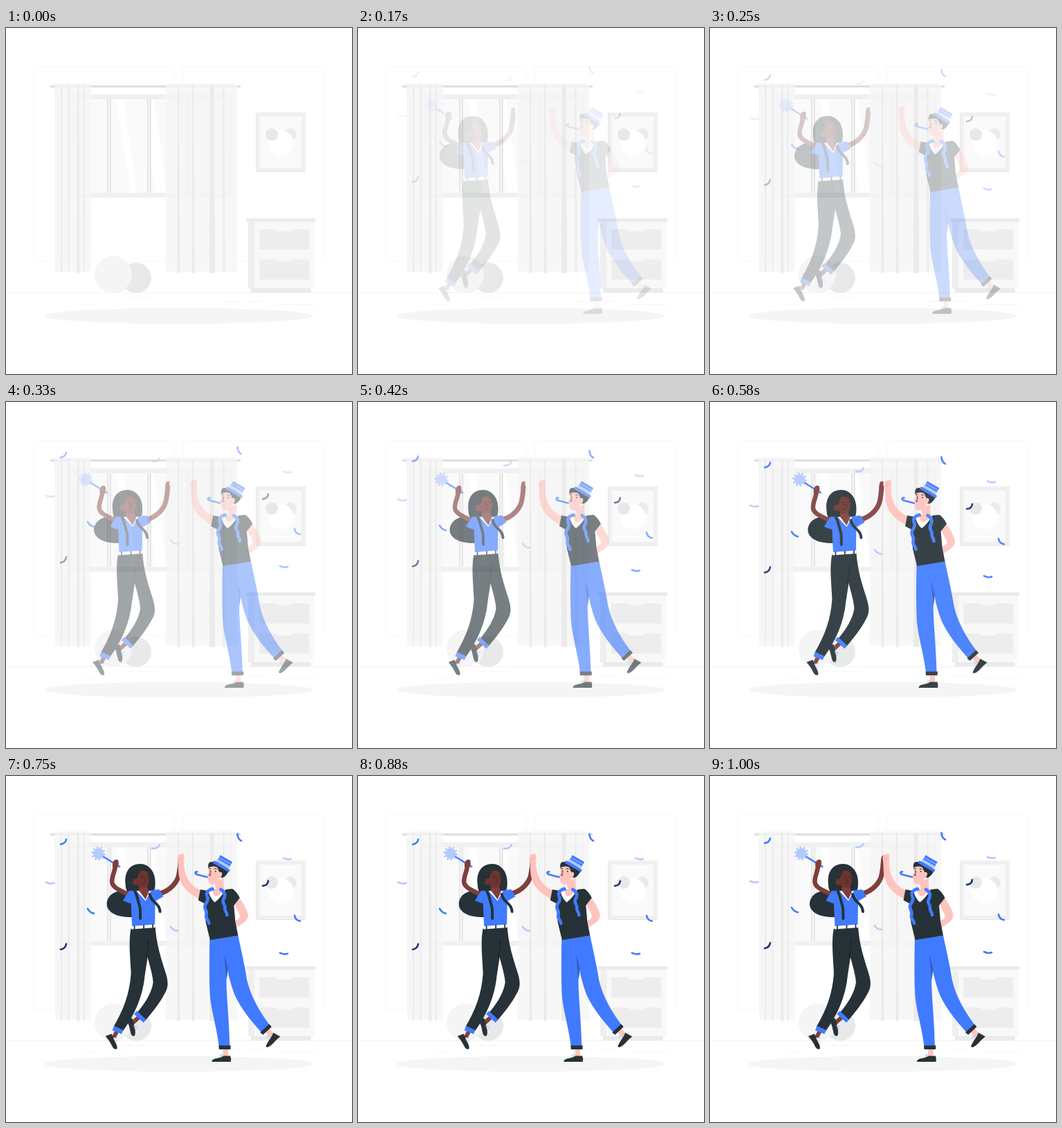
These frames come from a looping animation (500x500 px, 1040 ms). An HTML page:

```html
<!DOCTYPE html>
<html lang="en">
<head>
<meta charset="utf-8">
<title>Party high five</title>
<style>
  html, body { margin: 0; width: 100%; height: 100%; overflow: hidden; background: #fff; }
  svg { display: block; width: 100%; height: 100%; }
  :root { --p: 0; --shift: calc((1 - var(--p)) * 30px); }
  .girl, .man, .confetti { opacity: var(--p); }
  .girl { transform: translateX(calc(var(--shift) * -1)); }
  .man { transform: translateX(var(--shift)); }
  .confetti { transform: translateY(calc(var(--shift) * -1)); }
  .line { fill: none; stroke-linecap: round; stroke-linejoin: round; }
  .blue { fill: #407bff; }
  .pale { fill: #b3caff; }
  .dark { fill: #263238; }
  .brown { fill: #7f3e3b; }
  .pink { fill: #ffc3bd; }
  .s-blue { stroke: #407bff; }
  .s-pale { stroke: #b3caff; }
  .s-navy { stroke: #1e3470; }
  .s-dark { stroke: #263238; }
  .s-brown { stroke: #7f3e3b; }
  .s-pink { stroke: #ffc3bd; }
</style>
</head>
<body>
<svg viewBox="0 0 500 500">
  <!-- room -->
  <g fill="none" stroke="#f8f8f8">
    <rect x="39.5" y="55.5" width="203" height="282" rx="3"/>
    <rect x="255.500" y="55.5" width="203" height="282" rx="3"/>
    <path stroke="#f2f2f2" d="M0 382.500H500"/>
    <path stroke="#f5f5f5" d="M112 399.500h19M176 389.500h40M312 395.500h25M352 395.500h17M392 399.500h56"/>
  </g>

  <!-- window -->
  <rect x="89" y="96" width="238" height="149" fill="#f0f0f0"/>
  <rect x="93" y="103" width="230" height="135.500" fill="#fafafa"/>
  <path fill="#fff" d="M159 103h11l19 135h-9zM209 103h5l18 135h-15l-8-48z"/>
  <path fill="#f0f0f0" d="M146 103h6v135h-6zM204 103h6v135h-6zM261 103h6v135h-6z"/>
  <path stroke="#e0e0e0" d="M92.500 103V238M146.500 103V238M151.500 103V238M204.500 103V238M209 103V238M262 103V238"/>

  <!-- curtains -->
  <rect x="64" y="83" width="275" height="3" rx="1" fill="#dedede"/>
  <g fill="#f5f5f5" opacity=".8">
    <path d="M70 80h53l-1 272H71zM231 80h103v272H231z"/>
  </g>
  <g fill="#ebebeb">
    <path d="M79 82h2v272h-2zM89.500 82h2v272h-2zM103 82h2.500l1 272h-4zM111.500 82h2v272h-2z"/>
    <path d="M248 82h2l1.500 272h-4zM269 82h2l1.500 272h-4zM295 82h5l2 272h-8zM313.500 82h2l1 272h-3z"/>
  </g>

  <!-- picture -->
  <rect x="361" y="122" width="72" height="86" fill="#f0f0f0"/>
  <path fill="none" stroke="#e6e6e6" d="M361.500 122V207.500H432"/>
  <rect x="367" y="128" width="60" height="74" fill="#fafafa"/>
  <circle cx="411" cy="154" r="9" fill="#ebebeb"/>
  <circle cx="397" cy="166" r="18.500" fill="#fff"/>
  <circle cx="384" cy="154" r="9" fill="#e8e8e8"/>

  <!-- dresser -->
  <rect x="354" y="376" width="87" height="6" fill="#ebebeb"/>
  <rect x="350" y="280" width="95" height="96" fill="#f8f8f8"/>
  <rect x="350" y="280" width="9" height="96" fill="#efefef"/>
  <rect x="347" y="275" width="100" height="5" fill="#ebebeb"/>
  <g fill="#ededed">
    <path id="drawer" d="M366 291h25q1 3 4 3h14q3 0 4-3h25v29h-72z"/>
    <use href="#drawer" y="43.500"/>
  </g>

  <circle cx="188" cy="361" r="22" fill="#e8eaea"/>
  <circle cx="155" cy="356" r="27" fill="#f5f5f5"/>
  <ellipse cx="250" cy="416" rx="194" ry="11.500" fill="#f5f5f5"/>

  <g class="confetti">
    <g class="line" stroke-width="2.600">
      <path class="s-blue" d="M79 97q7-1 8-7M334.500 82q0 7 5.500 10M417 200q1 7 8 8M396 254q6 3 11 1M118 190q3 6 9 7"/>
      <path class="s-pale" d="M58 152q6 3 11.500 1M211 103q8 1 10.500-5M401 117q6 3 11 1M238 216q3 6 10 6"/>
      <path class="s-navy" d="M371 157q7 0 8-7M79 249q7-1 8-8"/>
    </g>
  </g>

  <g class="girl">
    <!-- hair behind -->
    <path class="dark" d="M184 171C164 160 146 169 144 183C143 198 160 205 184 204Z"/>
    <path class="dark" d="M171 156C169 138 178 127 192 127C206 127 215 140 214 156C214 166 210 172 204 174H182C174 170 171 165 171 156Z"/>
    <!-- back arm -->
    <path class="line s-brown" stroke-width="7" d="M220 170C236 166 246 153 248 143Q250 133 250.500 123"/>
    <path class="brown" d="M247.500 127Q246 119 249 115L253 114.500V128Z"/>
    <!-- lower legs -->
    <path class="line s-brown" stroke-width="6" d="M160 366L155 376M190 349L180 358" stroke-linecap="butt"/>
    <path class="dark" d="M142 376L151 372.500Q154 381 157 386Q160 392 158.500 394.500Q155 396 152 391Q149 384 142 376Z"/>
    <path class="dark" d="M172.500 352L181 350Q183 358 184.500 364Q186 373 184 375.500Q180 377 178.500 371Q177 361 172.500 352Z"/>
    <path class="line s-pale" stroke-width="1.300" d="M154 379l5-1M155.500 382l3 1M183 361l5 1M184 364l3 2"/>
    <!-- trousers -->
    <path class="dark" d="M190 220L214 218C216 244 222 262 228 281C232 293 234 303 229 312C221 328 210 341 200 353L187 343C198 330 209 314 211 298C210 284 204 268 200 250Z"/>
    <path class="dark" d="M179 220C175 238 178 262 179 285C177 315 168 338 154 362L167 369C184 345 196 320 199 288L203 262L210 219Z"/>
    <path class="line" stroke="#10191d" stroke-width=".8" d="M204 236Q204 250 201 262"/>
    <path class="blue" d="M154.500 361L167.500 367L165.500 373L152 367.500ZM187.500 339.500L201 352L197 356.500L183.500 344Z"/>
    <!-- shirt -->
    <path class="blue" d="M176 166Q184 165 190 166H205Q213 164 220 164L226 174L214 181L213.500 217L180.500 219L179 184L167.500 180Z"/>
    <path fill="#fff" d="M187 166L200 180.500L208 166Z"/>
    <path class="brown" d="M190 165Q191 161 191 156H202Q202 162 205 167L200 178.500Z"/>
    <path fill="#fff" d="M180 217L214 214.500V219L179.500 221.500Z"/>
    <path class="line s-dark" stroke-width="1.800" d="M184 217v4M197.500 216v4M210.500 215v4" stroke-linecap="butt"/>
    <!-- front arm and pompom -->
    <path class="line s-blue" stroke-width="2.600" d="M138 116L162.500 131"/>
    <circle class="pale" cx="132" cy="112" r="7.500"/>
    <circle class="line s-pale" cx="132" cy="112" r="7.500" stroke-width="5.500" pathLength="20" stroke-dasharray="1 1" style="stroke-linecap:butt"/>
    <path class="line s-brown" stroke-width="6.500" d="M173 170C163 165 152 161 151.500 153C151 145 156 138 156.500 128"/>
    <path class="brown" d="M152.500 132Q151 124 156 121Q161 119.500 161 125Q161 131 158.500 134Z"/>
    <path class="blue" d="M176 166L184 167L177 184L167.500 180Z"/>
    <!-- face -->
    <ellipse cx="185" cy="153" rx="3.500" ry="4.500" fill="#70342f"/>
    <path fill="#70342f" d="M186 150C189 147 190 142 192 137C198 135 204 138 205 145C206 153 204 159 199 161C192 162 187 158 186 150Z"/>
    <path class="line s-dark" stroke-width="1" d="M193 145.500l3-.6M201 144.500l2.500.6M198 147.500l1 4M195 155.500q4 0 5-2"/>
    <circle class="dark" cx="195.500" cy="148" r=".9"/>
    <circle class="dark" cx="202" cy="147.500" r=".9"/>
    <!-- loose strands -->
    <path class="line s-dark" stroke-width="4" d="M184.500 166C189 175 189 181 191.500 188C193 194 192 200 192.500 206M206 171C208 181 215 182 219 189Q220.500 192 221 196"/>
  </g>

  <g class="man">
    <!-- shoes and ankles -->
    <path class="line s-pink" stroke-width="7.500" d="M319 392V406M377 365L387 376" stroke-linecap="butt"/>
    <path class="dark" d="M299 413Q299 409 306 408Q312 407 316 404.500L326 404.500Q327.500 409 326.500 413Z"/>
    <path class="dark" d="M377 390.500Q380 384 383 380Q386 376 388 371L398 376.500Q392 381 388 386Q382 392 378.500 392Z"/>
    <path class="line s-pale" stroke-width="1.300" d="M311 405l2-3M313.500 404l3-2M381 379l-2-4M383 377l-2-3"/>
    <!-- trousers -->
    <path class="blue" d="M312 235L337 230C341 250 346 270 350 295C355 318 368 340 382 359L371 371C356 354 341 336 332 316C326 300 322 285 318 258Z"/>
    <path class="blue" d="M296 236L328 231L320.500 285C319 310 324 345 325 391H309.500C306 362 298 338 296.500 318C295 290 295.500 260 296 236Z"/>
    <path fill="#315fc9" d="M317 258L322.500 278L320.500 295Q318 275 317 258Z"/>
    <path class="dark" d="M309 389.500H326.500L326 395H309.500ZM369 370.500L382 358.500L385.500 362.500L373 374Z"/>
    <!-- hip arm -->
    <path class="pink" d="M331 184L339 176C345 185 352 195 351.500 203C349 212 338 217 327 222L322 223Q318 222 319 218L326 211C334 210 339 207 340 202Q336 194 331 184Z"/>
    <!-- raised arm -->
    <path class="pink" d="M284 179C268 172 257 163 252.500 148C250 138 251 130 250 122Q248.500 117 251 114L258 112Q260 113 259 125C259 140 264 157 283 165Z"/>
    <path class="line" stroke="#eda39b" stroke-width=".8" d="M252 119l4-1M252 122l3-1"/>
    <!-- vest -->
    <path class="dark" d="M282.500 164L294 166L300 164H318L329 163Q335 167 339.500 176L331 187L333 210L337 230.500L296.500 237L290.500 212L288 184L279.500 179.500Z"/>
    <path fill="#fff" d="M294 166Q297 178 303.500 182.500Q311 177 319 164Z"/>
    <path class="pink" d="M303 155L316 147Q315 158 317 164Q312 172 305 174Q300 171 300 166L305 163Z"/>
    <!-- head -->
    <path class="dark" d="M294 133Q293 127 296 124.500L309 123L324 135Q322 143 315 147L308 146Z"/>
    <path class="pink" d="M295 132Q302 129 307 132L310 139Q314 138 314 142Q313 147 310 147Q308 156 301 156.500Q294 157 294 150L292.500 145Q292 142 294.500 139Z"/>
    <path class="line s-dark" stroke-width="1" d="M295 134.500l2.500-.8M303 134l3 .6M297.500 139l-2 4.500h2"/>
    <circle class="dark" cx="297" cy="137.500" r=".9"/>
    <circle class="dark" cx="304.500" cy="138" r=".9"/>
    <!-- blower -->
    <path class="line s-blue" stroke-width="2.700" d="M292 146L278 142.500C274 141.500 274.500 138 278 138.500"/>
    <!-- hat -->
    <g transform="translate(315 126) rotate(30)">
      <rect class="blue" x="-9" y="-8.500" width="20" height="9"/>
      <rect class="pale" x="-10" y="-1.500" width="21" height="4.500" opacity=".95"/>
      <rect class="blue" x="-13" y="3" width="27" height="4" rx="1"/>
      <path stroke="#86aaff" stroke-width="1.500" d="M-9-4.500H11"/>
    </g>
    <!-- garland -->
    <path class="line s-blue" stroke-width="4.600" d="M300 163C290 166 291 171 293 176C295 182 288 184 289 190C290 195 293 196 291 202C290 207 295 208 295 213M312 164C319 168 319 173 316 178C313 184 319 186 318 190C317 195 321 196 321 201"/>
    <path class="line" stroke="#2f62dc" stroke-width=".8" d="M292 172l3 2M288 187l3 1M291 200l2 2M316 174l2 2M316 186l3 1"/>
  </g>
</svg>
<script>
  const LOOP = 1040, FRAME = 1000 / 24, START = 3;

  // Bézier easing with a slight overshoot before it settles.
  function ease(x) {
    if (x >= 1) return 1;
    const curve = (a, b, s) => 3 * a * s * (1 - s) ** 2 + 3 * b * s * s * (1 - s) + s ** 3;
    let lo = 0, hi = 1;
    for (let i = 0; i < 24; i++) {
      const mid = (lo + hi) / 2;
      if (curve(0.36, 0.5, mid) < x) lo = mid; else hi = mid;
    }
    return curve(-0.01, 1.38, lo);
  }

  // The motion runs at 24 steps a second, on a 10 ms clock.
  function draw() {
    const t = performance.now() % LOOP;
    const step = Math.floor((t - t % 10 + 4.9) / FRAME);
    const p = step < START ? 0 : ease((step + 0.5) / 24);
    document.documentElement.style.setProperty("--p", p.toFixed(4));
    requestAnimationFrame(draw);
  }
  draw();
</script>
</body>
</html>
```
